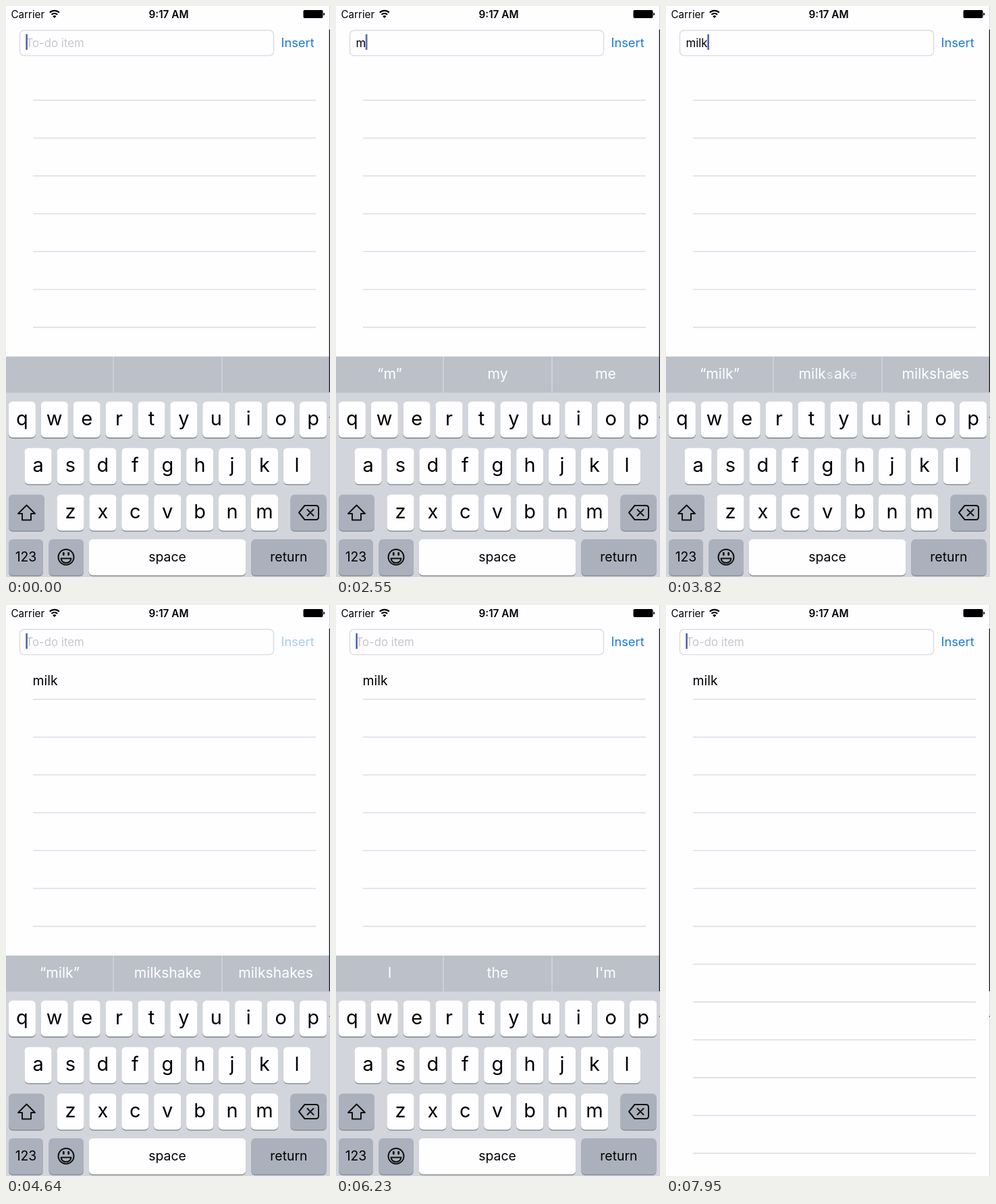
An HTML page that plays this animation: 480 px wide and 847 px high, repeating every 8000 ms.

```html
<!DOCTYPE html>
<html lang="en">
<head>
<meta charset="utf-8">
<title>To-do list</title>
<style>
html, body { margin: 0; width: 100%; height: 100%; overflow: hidden; background: #fefdff; }
svg { display: block; width: 100vw; height: 100vh; font-family: Inter, Roboto, "Liberation Sans", sans-serif; }
text { white-space: pre; }
.mid { text-anchor: middle; }
.field { font-size: 16.8px; }
.hint { fill: #c6c7cd; }
.caret { fill: #4359b3; }
.blink { animation: blink 1s linear infinite; }
.caret-move { animation: caret 8s step-end infinite; }
.insert { fill: #1c7ad9; font-size: 18.3px; animation: press 8s linear infinite; }
.rows { stroke: #dddee4; stroke-width: 1.6; }
.keyboard { animation: dismiss 8s linear infinite; }
.key { fill: #fefdff; }
.dark { fill: #abb1bc; }
.shade { fill: #8b8f97; }
.letter { font-size: 29px; }
.label { font-size: 19.4px; }
.icon { fill: none; stroke: #111; stroke-width: 2; stroke-linejoin: round; stroke-linecap: round; }
.words { fill: #fff; font-size: 21.2px; }
.grow { animation: grow 8s linear infinite; }
.bubble { fill: #fefdff; filter: drop-shadow(0 1px 3px rgba(40, 45, 55, .45)); }
.big { font-size: 50px; }

@keyframes blink {
  0%, 37% { opacity: 1; }
  50%, 82% { opacity: 0; }
  95%, 100% { opacity: 1; }
}
@keyframes caret {
  0% { transform: translateX(0); }
  28.25% { transform: translateX(14.5px); }
  33.625% { transform: translateX(18.7px); }
  38.375% { transform: translateX(22.8px); }
  44.375% { transform: translateX(32px); }
  57.5%, 100% { transform: translateX(0); }
}
@keyframes press {
  0%, 56% { opacity: 1; }
  56.3%, 57.5% { opacity: .25; }
  60.5%, 100% { opacity: 1; }
}
@keyframes grow {
  0%, 47.1% { fill-opacity: .2; }
  48.4%, 100% { fill-opacity: 1; }
}
@keyframes dismiss {
  0%, 89.95% { transform: translateY(0); animation-timing-function: cubic-bezier(.25, .6, .3, 1); }
  92.55%, 100% { transform: translateY(330px); }
}
</style>
</head>
<body>
<svg id="stage" viewBox="0 0 480 847">
  <rect width="480" height="847" fill="#fefdff"/>

  <text x="7.5" y="17.5" font-size="15.2">Carrier</text>
  <g fill="none" stroke="#000" stroke-width="2.1">
    <path d="M64.8 9.8a9.8 9.8 0 0 1 14 0M67.4 12.8a6.2 6.2 0 0 1 8.8 0"/>
    <path d="M71.8 18l-2.6-2.8a3.8 3.8 0 0 1 5.2 0z" fill="#000" stroke="none"/>
  </g>
  <text class="mid" x="241" y="17.5" font-size="15.3" font-weight="600">9:17 AM</text>
  <rect x="440.5" y="6" width="29" height="12" rx="2"/>
  <path d="M470.3 10q2 0 2 2t-2 2z"/>

  <rect x="20.5" y="36.2" width="376" height="37.4" rx="6" fill="#fefdff" stroke="#d9dce3" stroke-width="1.4"/>
  <g id="field" class="field"></g>
  <g class="caret-move">
    <rect class="caret blink" x="29.4" y="42" width="2.4" height="23"/>
    <rect class="caret" id="solid" x="29.4" y="42" width="2.4" height="23"/>
  </g>
  <text class="insert" x="407.5" y="61">Insert</text>

  <g id="rows" class="rows"></g>
  <text id="item" x="39.5" y="118.5" font-size="19.4">milk</text>

  <g class="keyboard">
    <rect y="573" width="480" height="274" fill="#d2d5dc"/>
    <rect y="520" width="480" height="53.5" fill="#bbc0c9"/>
    <path d="M159 520v53.5M320 520v53.5" stroke="#d8dbe1" stroke-width="1.2"/>
    <g id="words" class="words mid"></g>
    <g id="keys"></g>
    <g class="icon">
      <path d="M30.5 740.5L43 753h-6v9.500h-13V753h-6z"/>
      <path d="M442.500 741H459q4 0 4 4v13q0 4-4 4H442.500L434 751.500zM446.500 747l9 9M455.500 747l-9 9"/>
      <circle cx="89" cy="817.500" r="11.500"/>
      <path d="M81.500 819.500h15q-1 6.500-7.500 6.500t-7.500-6.500z"/>
      <path d="M85.300 811.500v2.600M92.700 811.500v2.600" stroke-width="2.8"/>
    </g>
    <g id="popups"></g>
  </g>

  <rect x="479" width="1" height="847" fill="#d4d4d9"/>
  <rect x="478.700" y="35" width="1.300" height="538" fill="#17181c"/>
  <rect x="478.700" y="609.500" width="1.300" height="1.500" fill="#55575d"/>
</svg>
<script>
const LOOP = 8000;
const $ = id => document.getElementById(id);
const sheet = document.head.appendChild(document.createElement('style'));
let count = 0;

function add(parent, tag, attrs, text) {
  const el = document.createElementNS('http://www.w3.org/2000/svg', tag);
  for (const name in attrs) el.setAttribute(name, attrs[name]);
  if (text) el.textContent = text;
  return parent.appendChild(el);
}

// Hidden at first, then switched on and off at the given times.
function show(el, ...times) {
  const name = 'show' + count++;
  const steps = times.map((t, i) => `${t / LOOP * 100}% { opacity: ${i % 2 ? 0 : 1}; }`);
  sheet.append(`@keyframes ${name} { 0% { opacity: 0; } ${steps.join(' ')} }\n`);
  el.style.animation = `${name} ${LOOP}ms step-end infinite`;
}

// Input field
const typed = [['m', 2260], ['mi', 2690], ['mil', 3070], ['milk', 3550]];
const CLEAR = 4600;
typed.forEach(([word, from], i) => {
  const to = i < 3 ? typed[i + 1][1] : CLEAR;
  show(add($('field'), 'text', { x: 29.5, y: 60.5 }, word), from, to);
});
show(add($('field'), 'text', { x: 29.5, y: 60.5, class: 'hint' }, 'To-do item'), 0, 2260, CLEAR, LOOP);
show($('solid'), 2260, 4370, CLEAR, 5000);
show($('item'), CLEAR, LOOP);

// List
for (let i = 0; i < 13; i++) {
  add($('rows'), 'path', { d: `M40 ${139.8 + i * 56.13}H459` });
}

// Suggestion bar
function suggest(words, from, to) {
  const g = add($('words'), 'g', {});
  words.forEach((word, i) => add(g, 'text', { x: 79.5 + i * 160, y: 553 }, word));
  show(g, from, to);
  return g;
}
suggest(['“m”', 'my', 'me'], 2400, 2820);
suggest(['“mi”', 'Miami', 'Michigan'], 2820, 3230);
suggest(['“mil”', 'milk', 'miles'], 3230, 3770);
const morph = suggest(['“milk”'], 3770, 3870);
const piece = (x, text, size) => add(morph, 'text', {
  x, y: 553, 'text-anchor': 'start', ...(size && { 'font-size': size, class: 'grow' })
}, text);
piece(196.5, 'milk');
piece(238, 's', 18);
piece(249, 'ak');
piece(273, 'e', 17);
piece(349.5, 'milksha');
piece(423.5, 'k', 20);
piece(425.5, 'es');
suggest(['“milk”', 'milkshake', 'milkshakes'], 3870, 4720);
suggest(['I', 'the', "I'm"], 4720, LOOP);

// Keys
const places = {};
function key(x, y, w, text, style, kind) {
  add($('keys'), 'rect', { x, y: y + 1.6, width: w, height: 53.4, rx: 6, class: 'shade' });
  add($('keys'), 'rect', { x, y, width: w, height: 53.4, rx: 6, class: kind || 'key' });
  if (text) {
    const base = style === 'letter' ? 35 : 33.2;
    add($('keys'), 'text', { x: x + w / 2, y: y + base, class: 'mid ' + style }, text);
  }
}
[['qwertyuiop', 3.7, 586.7], ['asdfghjkl', 27.5, 655.8], ['zxcvbnm', 75.4, 724.8]].forEach(([row, left, y]) => {
  [...row].forEach((c, i) => {
    const x = left + i * 47.92;
    places[c] = [x, y];
    key(x, y, 40.2, c, 'letter');
  });
});
key(4, 724.8, 53, '', '', 'dark');
key(421.5, 724.8, 53.3, '', '', 'dark');
key(4, 791, 51, '123', 'label', 'dark');
key(63.5, 791, 51.5, '', '', 'dark');
key(122.7, 791, 232.6, 'space', 'label');
key(363.3, 791, 111.3, 'return', 'label', 'dark');

// Enlarged key while pressed
function popup(c, from, to) {
  const [x, y] = places[c];
  const g = add($('popups'), 'g', { transform: `translate(${x + 20.1} ${y})` });
  add(g, 'path', {
    class: 'bubble',
    d: 'M-26.500 -83h53q10 0 10 10v50q0 7-5 12l-7 7q-4.400 4.500-4.400 12v39.500q0 6-6 6h-28.200q-6 0-6-6V8' +
       'q0-7.500-4.400-12l-7-7q-5-5-5-12v-50q0-10 10-10z'
  });
  add(g, 'text', { x: 0, y: -29, class: 'mid big' }, c);
  show(g, from, to);
}
popup('m', 2200, 2320);
popup('i', 2630, 2750);
popup('l', 3020, 3150);
popup('k', 3490, 3610);
</script>
</body>
</html>
```
